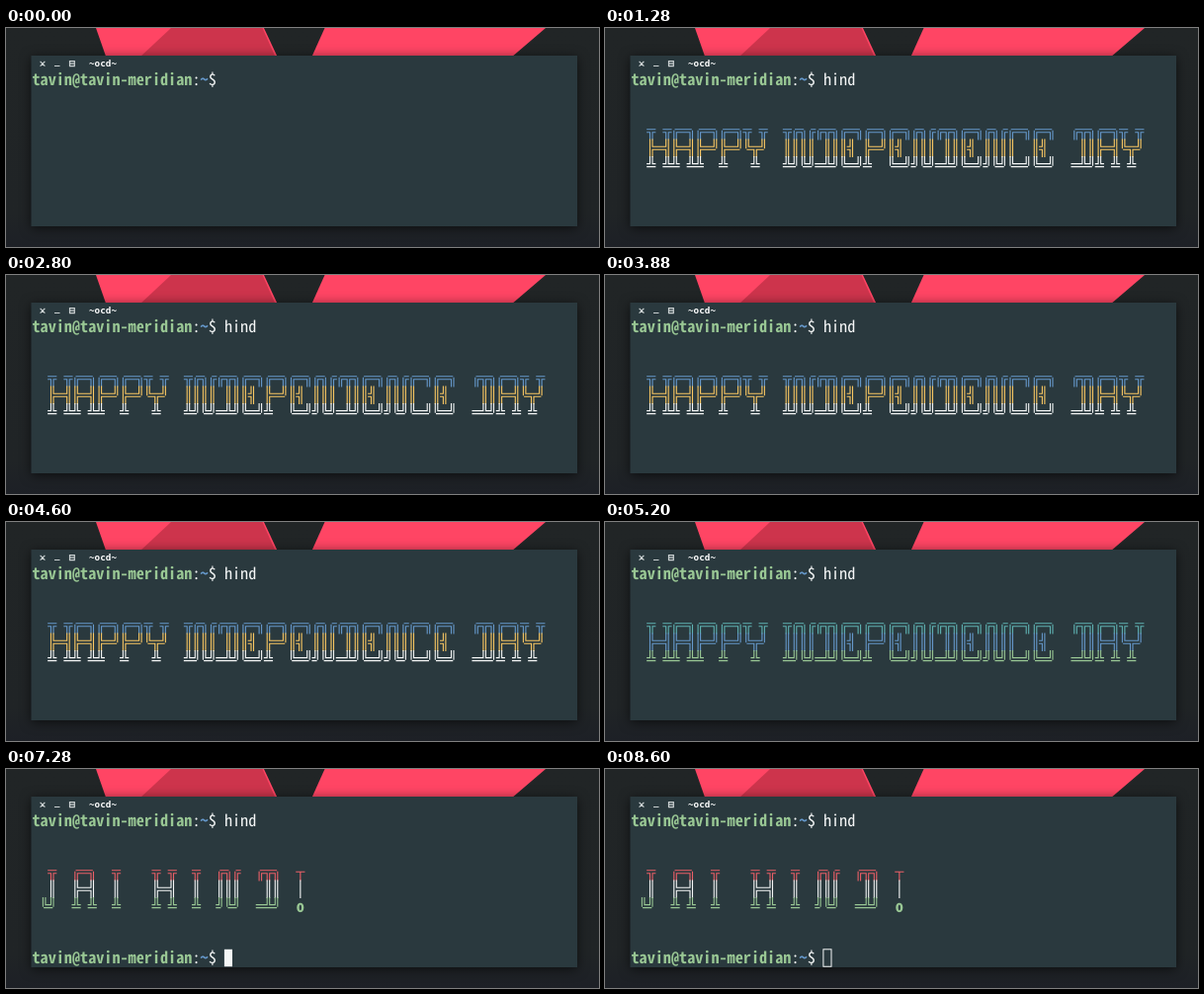
Recreate the animation shown at these times as an HTML page. Size 600 by 222 pixels, loop 9.96 s.

```html
<!DOCTYPE html>
<html lang="en">
<head>
<meta charset="utf-8">
<title>Terminal greeting</title>
<style>
  html, body { margin: 0; width: 100%; height: 100%; overflow: hidden; background: #202426; }
  svg { display: block; width: 600px; height: 222px; }
  .mono { font-family: "Noto Sans Mono CJK JP", "Noto Sans Mono", monospace; white-space: pre; text-rendering: geometricPrecision; }
  .bold { font-weight: 700; }
  .title { font: 700 9.3px "DejaVu Sans Mono", monospace; fill: #fff; }
  .win { filter: drop-shadow(0 2px 6px rgba(0, 0, 0, .6)); }
  .icon { fill: none; stroke: #ccd2d3; stroke-width: 1.2; }
  .art path { fill: none; stroke-width: 1.1; stroke-linecap: square; }
</style>
</head>
<body>
<svg id="stage" viewBox="0 0 600 222">
  <defs>
    <linearGradient id="desk" x2="0" y2="1">
      <stop offset="0" stop-color="#212526"/>
      <stop offset=".85" stop-color="#202426"/>
      <stop offset="1" stop-color="#1d2026"/>
    </linearGradient>
  </defs>
  <rect width="600" height="222" fill="url(#desk)"/>
  <path d="M91 0H261L275 30H101.5Z" fill="#ff4564"/>
  <path d="M167 0H259.5L273 30H135Z" fill="#cd344c"/>
  <path d="M322.5 0H546L511 30H309Z" fill="#ff4564"/>
  <rect class="win" x="25.5" y="28" width="552.5" height="173" fill="#2a393e"/>
  <path class="icon" d="M34.6 33.8l4.8 4.8m0-4.8l-4.8 4.8M49 38.5h5.5M64.5 33.7h4.8v5h-4.8zM64.5 36.2h4.8"/>
  <text class="title" x="84" y="39.3">~ocd~</text>
</svg>
<script>
const NS = "http://www.w3.org/2000/svg";
const stage = document.getElementById("stage");
const LOOP = 9960;
const X0 = 26.5, Y0 = 43.2, W = 8.1, H = 17.45, BASE = 14.3;
const GAP_X = 1.25, GAP_Y = 1.5;
const C = {
  red: "#ec5f67", green: "#99c794", yellow: "#fac863",
  blue: "#6699cc", cyan: "#5fb3b3", white: "#f5f7f7"
};
const colX = c => X0 + c * W;
const rowY = r => Y0 + r * H;

function add(parent, tag, attrs, text = "") {
  const node = document.createElementNS(NS, tag);
  for (const key in attrs) node.setAttribute(key, attrs[key]);
  node.textContent = text;
  return parent.appendChild(node);
}

// Font size at which one character fills one column
const family = '"Noto Sans Mono CJK JP", "Noto Sans Mono", monospace';
const pen = document.createElement("canvas").getContext("2d");
pen.font = "100px " + family;
const fontSize = W * 100 / pen.measureText("0").width;

function write(parent, col, row, text, fill, bold) {
  return add(parent, "text", {
    x: colX(col), y: rowY(row) + BASE, fill,
    "font-size": fontSize, class: bold ? "mono bold" : "mono"
  }, text);
}

function prompt(parent, row) {
  write(parent, 0, row, "tavin@tavin-meridian", C.green, true);
  write(parent, 20, row, ":", C.white);
  write(parent, 21, row, "~", C.blue, true);
  write(parent, 22, row, "$", C.white);
}

// Box drawing: arms are up, right, down, left
const DIRS = [[0, -1], [1, 0], [0, 1], [-1, 0]];
const ARMS = {
  "═": "0101", "║": "1010", "╔": "0110", "╗": "0011", "╚": "1100", "╝": "1001",
  "╦": "0111", "╩": "1101", "╠": "1110", "╣": "1011"
};
const THIN = { "┬": "0111", "│": "1010" };

function boxPath(ch, col, row) {
  const cx = colX(col) + W / 2, cy = rowY(row) + H / 2;
  const thin = THIN[ch];
  const arms = thin || ARMS[ch];
  if (!arms) return "";
  const has = k => arms[k % 4] === "1";
  let d = "";
  DIRS.forEach(([dx, dy], i) => {
    if (!has(i)) return;
    const end = dx ? W / 2 : H / 2;
    const gap = dx ? GAP_X : GAP_Y;
    for (const k of thin ? [0] : [i + 1, i + 3]) {
      const [px, py] = thin ? [0, 0] : DIRS[k % 4];
      const start = thin ? 0 : has(k) ? gap : has(k + 2) ? 0 : -gap;
      const x = cx + px * GAP_X, y = cy + py * GAP_Y;
      d += `M${(x + dx * start).toFixed(2)} ${(y + dy * start).toFixed(2)}`
         + `L${(x + dx * end).toFixed(2)} ${(y + dy * end).toFixed(2)}`;
    }
  });
  return d;
}

const LETTERS = {
  H: ["╦ ╦", "╠═╣", "╩ ╩"], A: ["╔═╗", "╠═╣", "╩ ╩"], P: ["╔═╗", "╠═╝", "╩  "],
  Y: ["╦ ╦", "╚╦╝", " ╩ "], I: ["╦", "║", "╩"], N: ["╔╗╔", "║║║", "╝╚╝"],
  D: ["╔╦╗", " ║║", "═╩╝"], E: ["╔═╗", "║╣ ", "╚═╝"], C: ["╔═╗", "║  ", "╚═╝"],
  J: [" ╦", " ║", "╚╝"], "!": ["┬", "│", "o"]
};

function banner(text, col, tracking, space) {
  const group = add(stage, "g", { class: "art" });
  const paths = ["", "", ""];
  for (const letter of text) {
    if (letter === " ") { col += space; continue; }
    const rows = LETTERS[letter];
    rows.forEach((line, r) => [...line].forEach((ch, i) => {
      if (ch === "o") write(group, col + i, 3 + r, ch, C.green, true);
      else paths[r] += boxPath(ch, col + i, 3 + r);
    }));
    col += rows[0].length + tracking;
  }
  const lines = paths.map(d => add(group, "path", { d }));
  return { group, lines };
}

prompt(stage, 0);
const typed = write(stage, 24, 0, "", C.white);
const greeting = banner("HAPPY INDEPENDENCE DAY", 2, 0, 2);
const finale = banner("JAI HIND!", 1, 2, 2);
[C.red, C.white, C.green].forEach((c, i) => finale.lines[i].setAttribute("stroke", c));
prompt(finale.group, 8);
const cursor = add(stage, "rect", { height: H, width: W, stroke: C.white });

const START = 1280, FINISH = 6120;
const PALETTES = [
  [C.blue, C.yellow, C.white],
  [C.cyan, C.blue, C.green]
];
const SLIPS = [16, 44];

// time, letters typed, cursor row, cursor column, cursor look
const STEPS = [
  [0, 0, 0, 24, ""],
  [80, 0, 0, 24, "block"],
  [120, 1, 0, 25, "block"],
  [200, 2, 0, 26, "block"],
  [280, 3, 0, 27, "block"],
  [320, 4, 0, 28, ""],
  [400, 4, 0, 28, "block"],
  [1000, 4, 0, 28, ""],
  [1080, 4, 1, 0, "block"],
  [START, 4, 1, 0, ""],
  [FINISH, 4, 8, 24, "block"],
  [6680, 4, 8, 24, ""],
  [7280, 4, 8, 24, "block"],
  [7880, 4, 8, 24, ""],
  [8520, 4, 8, 24, "block"],
  [8600, 4, 8, 24, "hollow"]
];

// Fifteen ticks a second on a 40 ms grid
function tick(t) {
  const rest = t % 200;
  return Math.floor(t / 200) * 3 + (rest >= 80) + (rest >= 120);
}

function show(node, on) {
  node.setAttribute("visibility", on ? "visible" : "hidden");
}

function render(t) {
  const [, count, row, col, look] = STEPS.findLast(s => s[0] <= t);
  typed.textContent = "hind".slice(0, count);

  show(cursor, look);
  cursor.setAttribute("x", colX(col));
  cursor.setAttribute("y", rowY(row));
  cursor.setAttribute("fill", look === "block" ? C.white : "none");
  cursor.setAttribute("stroke-width", look === "hollow" ? 1 : 0);

  show(greeting.group, t >= START && t < FINISH);
  show(finale.group, t >= FINISH);
  const n = tick(t) - tick(START);
  greeting.lines.forEach((line, r) => {
    // The flicker drifts by one beat, upper row first
    const drift = SLIPS.filter(s => n >= s + (r > 0)).length;
    line.setAttribute("stroke", PALETTES[Math.abs(n + drift) % 2][r]);
  });
}

function frame() {
  render(performance.now() % LOOP);
  requestAnimationFrame(frame);
}
frame();
</script>
</body>
</html>
```
